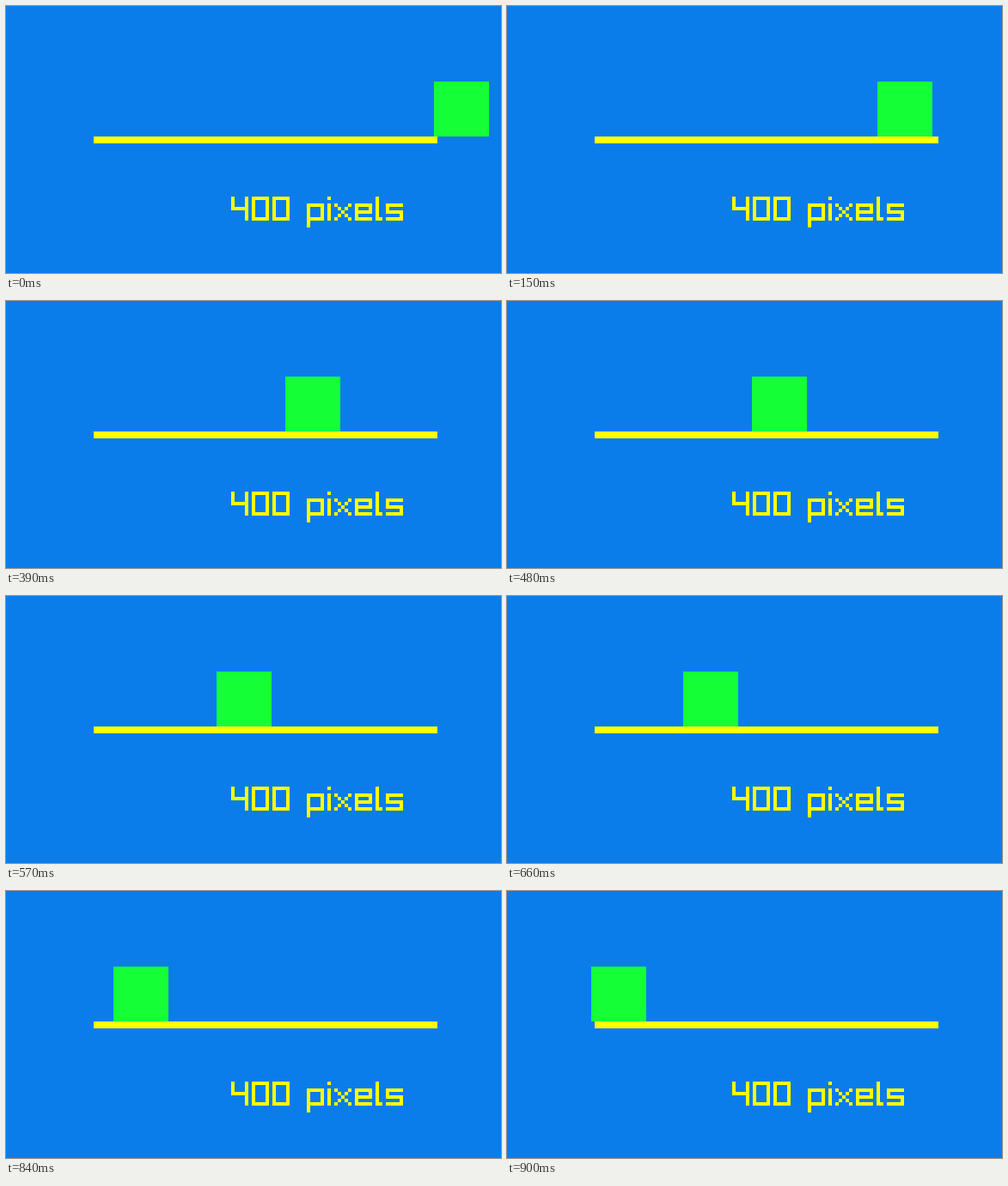
An HTML page for the animation above (0.92 s loop, 576 px wide and 311 px high).

```html
<!DOCTYPE html>
<html lang="en">
<head>
<meta charset="utf-8">
<title>400 pixels</title>
<style>
html, body { margin: 0; width: 100%; height: 100%; overflow: hidden; background: #0a7deb; }
svg { display: block; }
</style>
</head>
<body>
<svg width="576" height="311" viewBox="0 0 576 311" shape-rendering="crispEdges">
  <rect width="576" height="311" fill="#0a7deb"/>
  <rect x="102" y="152" width="400" height="8" fill="#ff0"/>
  <rect id="box" x="498" y="88" width="64" height="64" fill="#14ff36"/>
  <path id="label" role="img" aria-label="400 pixels" fill="#ff0"/>
</svg>
<script>
const LOOP = 920, STEP = 30, STEPS = 30, START = 498, DIST = 400;
const CELL = 4;

// Pixel font: rows from the top, separated by slashes
const GLYPHS = {
  '4': '#...#/#...#/#...#/#####/....#/....#/....#',
  '0': '#####/#...#/#...#/#...#/#...#/#...#/#####',
  p: '...../...../#####/#...#/#...#/#...#/#####/#..../#....',
  i: '#/./#/#/#/#/#',
  x: '...../...../#...#/.#.#./..#../.#.#./#...#',
  e: '...../...../#####/#...#/#####/#..../#####',
  l: '#./#./#./#./#./#./##',
  s: '...../...../#####/#..../#####/....#/#####',
  ' ': '...'
};

function pixelText(text, x, y) {
  let d = '';
  for (const ch of text) {
    const rows = GLYPHS[ch].split('/');
    rows.forEach((row, r) => {
      for (const run of row.matchAll(/#+/g)) {
        const w = run[0].length * CELL;
        d += `M${x + run.index * CELL} ${y + r * CELL}h${w}v${CELL}h${-w}z`;
      }
    });
    x += (rows[0].length + 1) * CELL;
  }
  return d;
}

document.getElementById('label').setAttribute('d', pixelText('400 pixels', 262, 222));
const box = document.getElementById('box');

function draw(ms) {
  const step = Math.floor((ms % LOOP) / STEP);
  box.setAttribute('x', Math.round(START - DIST * step / STEPS));
}

function tick() {
  draw(performance.now());
  requestAnimationFrame(tick);
}
tick();
</script>
</body>
</html>
```
